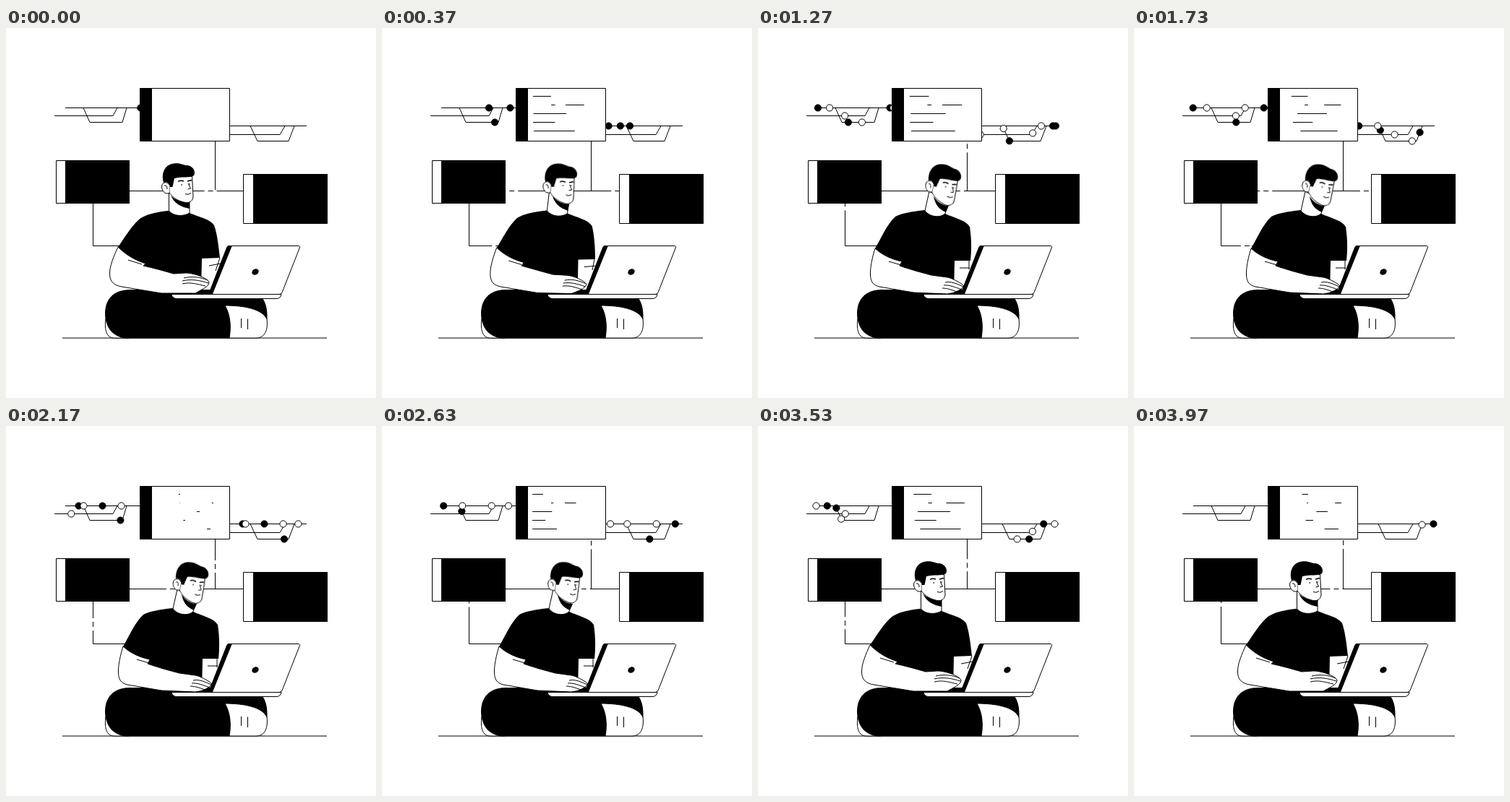
An HTML page that plays this animation: 512x512 px, repeating every 4000 ms.

```html
<!DOCTYPE html>
<html lang="en">
<head>
<meta charset="utf-8">
<title>Working on a laptop</title>
<style>
html, body { margin: 0; width: 100%; height: 100%; overflow: hidden; background: #fff; }
svg { display: block; width: 100vw; height: 100vh; }
.line { fill: none; stroke: #000; }
.shape { fill: #fff; stroke: #000; }
.solid { fill: #000; }
.gap { fill: none; stroke: #fff; stroke-width: 3; stroke-dasharray: 5 7 5 900;
  animation: climb 1333.333ms linear -1033.333ms infinite; }
.across { animation-name: across; }
.morph { animation: morph 4s infinite; }
.head { transform-origin: 239px 248px; animation: nod 4s infinite; }

@keyframes climb {
  0% { stroke-dashoffset: 18; }
  15% { stroke-dashoffset: -15; }
  32% { stroke-dashoffset: -53; }
  77.4% { stroke-dashoffset: -96; }
  77.5%, 100% { stroke-dashoffset: -130; }
}
@keyframes across {
  0% { stroke-dashoffset: 8; }
  15% { stroke-dashoffset: -15; }
  75% { stroke-dashoffset: -100; }
  100% { stroke-dashoffset: -135; }
}
@keyframes morph {
  0% { d: var(--a); animation-timing-function: ease-in-out; }
  18% { d: var(--b); animation-timing-function: linear; }
  67% { d: var(--b); animation-timing-function: ease-in-out; }
  89%, 100% { d: var(--a); }
}
@keyframes nod {
  0% { transform: none; animation-timing-function: ease-in-out; }
  18% { transform: translate(9px, 1px) rotate(10deg); animation-timing-function: ease-out; }
  43% { transform: translate(10px, 1px) rotate(14deg); animation-timing-function: ease-in-out; }
  66% { transform: translate(9px, 1px) rotate(10deg); animation-timing-function: ease-in-out; }
  86%, 100% { transform: none; }
}
</style>
</head>
<body>
<svg viewBox="0 0 512 512">
  <!-- wiring -->
  <g class="line">
    <path d="M82 110.500H185M67 121.500H148L154 110.500M167 110.500L161 130.500H116L107 110.500"/>
    <path d="M310 135.500H416M310 147.500H379L386 135.500M338 135.500L348 156.500H391L399 135.500"/>
    <path d="M170 301.500H120.500V243M171 225.500H328M289.500 225V157"/>
  </g>
  <path class="gap" d="M163 301.500H120.500V243"/>
  <path class="gap" d="M328 225.500H289.500V157"/>
  <path class="gap across" d="M171 225.500H328"/>
  <g id="dots" stroke="#000"></g>

  <!-- cards -->
  <path class="shape" d="M185.500 83.500H309.500V156.500H185.500Z"/>
  <path class="solid" d="M185 83H202V157H185Z"/>
  <path class="shape" d="M69.500 183.500H170.500V242.500H69.500Z"/>
  <path class="solid" d="M82 183H171V243H82Z"/>
  <path class="shape" d="M328.500 202.500H444.500V270.500H328.500Z"/>
  <path class="solid" d="M342 202H445V271H342Z"/>
  <g id="code" class="line"></g>

  <!-- legs -->
  <path class="line" d="M78 429H444"/>
  <path class="shape" d="M138 402C136 418 139 429 150 429H170L150 405Z"/>
  <path class="solid" d="M137 395C137 376 148 362 172 362H345C357 374 362 382 361.500 403L309 429.500H168C148 429 137 414 137 395Z"/>
  <path class="shape" d="M303 384C330 384 355 389 361 403C363 420 357 429 346 429H309C312 412 310 396 303 384Z"/>
  <path class="line" d="M325.500 402V415M334.500 402.500V417"/>

  <!-- body -->
  <path class="solid morph" style="
    --a: path('M224 253C205 255 190 259 183 266C172 276 163 292 155 303C166 314 178 321 193 326L190 330L190 366L270 366L271 319L296 318C294 300 292 284 288 273C282 264 268 262 254 256Z');
    --b: path('M231 252C212 254 197 257 190 261C178 272 170 292 162 305C172 314 184 320 199 323L196 330L196 366L271 366L272 322L294 322C296 305 295 288 293 275C288 266 272 263 259 257Z')"/>
  <path class="line morph" style="
    --a: path('M296 318L290 336M297 326L281 329');
    --b: path('M292 322L292 334M293 332L279 332')"/>
  <path class="shape morph" style="
    --a: path('M225.500 225L225.500 253C232 261 246 261 254 256L254 236Z');
    --b: path('M237 226L231 253C238 262 252 263 259 257L262 240Z')"/>
  <path class="solid morph" style="
    --a: path('M228 232C234 238 244 242 254 241L254 250C243 248 233 243 228 232Z');
    --b: path('M243 233C248 241 256 246 264 246L260 255C252 252 245 245 243 233Z')"/>

  <g class="head">
    <path class="shape" d="M226 214L232 205H257.500L259 234C258 241 251 243 246 241C238 239 231 235 226 228Z"/>
    <path class="solid" d="M218 214C214 201 220 189 232 187.500C241 186 246 190 251 190C259 191 263 199 260 204C255 208 243 205 233 208L230.500 220H227C226 214 222 212 218 214Z"/>
    <path class="shape" d="M226 217C222 211 215 214 215.500 220C216 227 222 231 226 228"/>
    <path class="line" d="M219 218Q223 217 223 223"/>
    <path class="line" stroke-width="1.500" d="M238 212.500Q241 210.500 246 212M251 212L257 210.500"/>
    <path class="line" d="M242 217H244M253 216H255M252 215L255.500 222L251.500 223M248 229.500Q252 231.500 256 228.500"/>
  </g>

  <path class="shape morph" style="
    --a: path('M155 303C149 316 143 330 143.500 341C144 352 150 356 160 358L215 367L262 367C270 362 281 358 281 352C280 347 262 339 248 339L232 340C218 336 204 332 190 329L193 326C178 321 166 314 155 303Z');
    --b: path('M162 305C158 318 155 332 155.500 342C156 352 160 356 168 358L215 366L262 368C270 367 280 364 285 357C280 352 268 346 262 345L240 342C225 338 210 334 196 329L199 323C184 320 172 314 162 305Z')"/>
  <path class="line morph" style="
    --a: path('M169 321L188 327M246 346C258 343 270 345 279 349M244 350C256 347 268 349 280 353M244 354C256 351 266 355 276 357');
    --b: path('M181 323L198 328M259 352C266 350 276 354 284 358M257 356C264 355 274 359 282 362M255 360C262 360 270 363 278 366')"/>

  <!-- laptop -->
  <path class="shape" d="M309 301.500H404Q408 301.500 406 305L382 366Q381 368.500 378 368.500H282Z"/>
  <path class="solid" d="M308 301H313L286 368H280L305 304Q306 301 308 301Z"/>
  <ellipse class="solid" cx="345" cy="337.500" rx="5" ry="4" transform="rotate(-35 345 337.500)"/>
  <path class="shape" d="M229 368.500H381Q380 374.500 374 374.500H237Q230 374.500 229 368.500Z"/>
</svg>
<script>
const LOOP = 4000;

function create(tag, attrs) {
  const el = document.createElementNS('http://www.w3.org/2000/svg', tag);
  for (const k in attrs) el.setAttribute(k, attrs[k]);
  return el;
}
const add = (parent, tag, attrs) =>
  document.getElementById(parent).appendChild(create(tag, attrs));

// Each lane sends a pair of dots, one to each side, at every departure time.
const lanes = [
  { speed: 0.105,
    sides: ['M190 110.5H76', 'M301 135.5H416'],
    black: [-30, 250, 1632, 2632], white: [404, 1384, 1880, 2265, 2487] },
  { speed: 0.115,
    sides: ['M190 110.5H154L148 121.5H76', 'M305 147.5H379L386 135.5H416'],
    black: [], white: [606, 1246, 2871] },
  { speed: 0.122,
    sides: ['M190 110.5H167L161 130.5H116L107 110.5H74', 'M281 135.5H338L348 156.5H391L399 135.5H416'],
    black: [-30, 614, 1209, 1789, 2649], white: [770, 2785] }
];

const dots = [];
for (const fill of ['black', 'white'])
  for (const { speed, sides, [fill]: departures } of lanes)
    for (const d of sides) {
      const road = create('path', { d });
      const length = road.getTotalLength();
      for (const start of departures)
        dots.push({ road, length, speed, start, el: add('dots', 'circle', { r: 4.6, fill }) });
    }

// Lines of code: [row, left, right]; each pass writes them, then wipes them.
const rowY = row => 94.5 + 12 * row;
const passes = [{ start: 50, span: 800 }, { start: 400, span: 1800 }, { start: 2300, span: 1800 }];
const strokes = [
  [0, 208, 241], [1, 234, 241], [1, 253, 287], [2, 208, 268], [3, 208, 248], [4, 208, 283]
].map(([row, left, right]) => ({ y: rowY(row), left, width: right - left, el: add('code', 'path', {}) }));

function drawStroke({ y, left, width, el }, t) {
  let d = '';
  for (const { start, span } of passes) {
    const u = (t - start) / span;
    if (u <= 0 || u >= 1) continue;
    const front = 1 - (1 - u) ** 3, back = u ** 4;
    d += `M${left + width * back} ${y}H${left + width * front}`;
  }
  el.setAttribute('d', d);
}

function drawDot({ road, length, speed, start, el }, t) {
  const s = (t - start) * speed;
  const shown = s >= 0 && s <= length;
  el.style.display = shown ? '' : 'none';
  if (!shown) return;
  const { x, y } = road.getPointAtLength(s);
  el.setAttribute('cx', x);
  el.setAttribute('cy', y);
}

function render(t) {
  for (const dot of dots) drawDot(dot, t);
  for (const stroke of strokes) drawStroke(stroke, t);
}

let begin;
function tick(now) {
  begin ??= now;
  render((now - begin) % LOOP);
  requestAnimationFrame(tick);
}
render(0);
requestAnimationFrame(tick);
</script>
</body>
</html>
```
